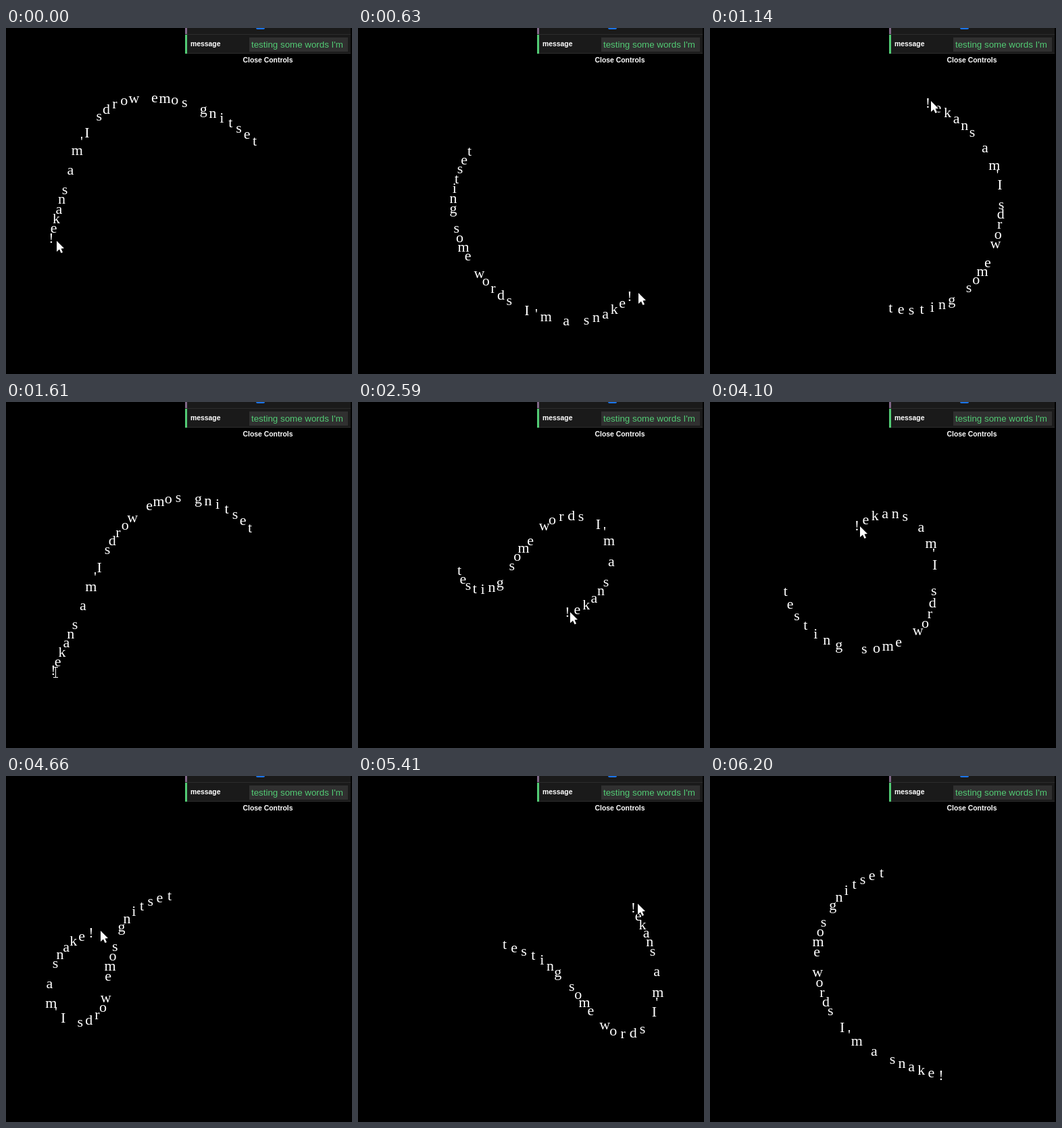
An HTML page with a canvas that plays this animation: 512x512 px, repeating every 6600 ms.

```html
<!DOCTYPE html>
<html>
<head>
<meta charset="utf-8">
<title>Text snake</title>
<style>
  html, body { margin: 0; height: 100%; overflow: hidden; background: #000; }
  canvas { display: block; }
</style>
</head>
<body>
<canvas id="stage" width="512" height="512"></canvas>
<script>
const ctx = document.getElementById('stage').getContext('2d');
const MESSAGE = "testing some words I'm a snake!";
const GAP = 15, SPAN = 5, LOOP = 6600, SUBSTEPS = 8;

// Each stop: time, body (every fifth letter, tail to head), and the head's route to the next stop.
const stops = [
  { time: 0, steps: 12,
    body: [[368,169],[306,128],[235,106],[161,114],[112,170],[87,241],[67,313]],
    route: [[80,420],[150,488],[250,482],[335,441]] },
  { time: 630, steps: 19,
    body: [[165,184],[141,254],[156,326],[200,387],[264,425],[338,434],[402,399]],
    route: [[438,310],[425,200],[350,125],[260,109],[180,160],[120,265]] },
  { time: 1610, steps: 19,
    body: [[361,188],[299,148],[226,149],[166,195],[132,261],[102,331],[70,399]],
    route: [[105,392],[180,315],[235,225],[290,145],[350,124],[382,180],[375,262]] },
  { time: 2590, steps: 18,
    body: [[150,251],[198,276],[245,218],[301,171],[365,194],[367,268],[310,313]],
    route: [[248,322],[205,255],[205,160],[160,82],[95,100],[66,180],[72,265],[112,335]] },
  { time: 3540, steps: 21,
    body: [[247,196],[196,146],[125,132],[81,190],[88,263],[124,328],[172,385]],
    route: [[245,387],[335,335],[358,235],[285,160],[200,200],[158,290],[125,400],[68,385],[62,285]] },
  { time: 4660, steps: 29,
    body: [[242,179],[179,213],[154,283],[135,355],[74,351],[73,279],[126,234]],
    route: [[220,220],[310,280],[360,390],[422,458],[452,360],[425,230],[345,125],
            [240,112],[165,178],[143,285],[180,380],[250,430]] },
  { time: 6200,
    body: [[254,145],[191,181],[160,247],[166,322],[206,385],[270,421],[342,445]],
    route: [] }
];

const sub = (a, b) => [a[0] - b[0], a[1] - b[1]];
const addScaled = (a, b, k) => [a[0] + b[0] * k, a[1] + b[1] * k];
const resize = (v, length) => {
  const k = length / (Math.hypot(v[0], v[1]) || 1);
  return [v[0] * k, v[1] * k];
};

const tangents = points => points.map((p, i) => {
  const d = sub(points[i + 1] || p, points[i - 1] || p);
  return [d[0] / 2, d[1] / 2];
});

function hermite(points, tans, u) {
  const i = Math.min(Math.floor(u), points.length - 2), f = u - i, g = 1 - f;
  return [0, 1].map(k =>
    (1 + 2 * f) * g * g * points[i][k] + f * g * g * tans[i][k] +
    f * f * (3 - 2 * f) * points[i + 1][k] - f * f * g * tans[i + 1][k]);
}

// Mirrors a tangent about the chord, so that the end of the body bends like an arc.
function mirror(tan, from, to) {
  const c = resize(sub(to, from), 1);
  const dot = tan[0] * c[0] + tan[1] * c[1];
  return [2 * dot * c[0] - tan[0], 2 * dot * c[1] - tan[1]];
}

function layLetters(body) {
  const tans = tangents(body).map(t => resize(t, GAP * SPAN)), n = body.length - 1;
  tans[0] = mirror(tans[1], body[0], body[1]);
  tans[n] = mirror(tans[n - 1], body[n - 1], body[n]);
  return [...MESSAGE].map((_, i) => hermite(body, tans, i / SPAN));
}

function buildPoses() {
  const path = stops.flatMap(s => [s.body[s.body.length - 1], ...s.route]);
  const pathTans = tangents(path);
  const head = MESSAGE.length - 1;
  const poses = [{ time: 0, letters: layLetters(stops[0].body) }];
  let start = 0;
  stops.slice(0, -1).forEach((stop, k) => {
    const next = stops[k + 1], pieces = stop.route.length + 1;
    const total = stop.steps * SUBSTEPS, rope = layLetters(stop.body), leg = [];
    for (let s = 1; s <= total; s++) {
      rope[head] = hermite(path, pathTans, start + pieces * s / total);
      for (let i = head - 1; i >= 0; i--)
        rope[i] = addScaled(rope[i + 1], resize(sub(rope[i], rope[i + 1]), GAP), 1);
      if (s % SUBSTEPS === 0) leg.push([...rope]);
    }
    // Ease the simulated rope onto the next known body.
    const drift = layLetters(next.body).map((p, i) => sub(p, rope[i]));
    leg.forEach((letters, s) => {
      const u = (s + 1) / stop.steps;
      poses.push({
        time: stop.time + u * (next.time - stop.time),
        letters: letters.map((p, i) => addScaled(p, drift[i], u))
      });
    });
    start += pieces;
  });
  return poses;
}

function rect(color, x, y, w, h) {
  ctx.fillStyle = color;
  ctx.fillRect(x, y, w, h);
}

function label(text, x, y, color, font, align = 'left') {
  ctx.fillStyle = color;
  ctx.font = font;
  ctx.textAlign = align;
  ctx.fillText(text, x, y);
}

function drawPanel() {
  const small = 'bold 10.4px "Liberation Sans", Arial, sans-serif';
  rect('#1a1a1a', 265, 0, 245, 37);
  rect('#2c2c2c', 265, 9, 245, 1);
  rect('#2c2c2c', 265, 37, 245, 1);
  rect('#806787', 265, 0, 3, 9);
  rect('#52cb74', 265, 10, 3, 28);
  rect('#303030', 360, 14, 146, 21);
  ctx.fillStyle = '#1a73e8';
  ctx.beginPath();
  ctx.roundRect(370, -8, 13, 10, 2);
  ctx.fill();
  label('message', 273, 27, '#fff', small);
  label("testing some words I'm", 363, 29, '#52cb74', '13.333px "Liberation Sans", Arial, sans-serif');
  label('Close Controls', 387.5, 51, '#fff', small, 'center');
}

function drawPointer(letters, time) {
  const n = letters.length, dir = resize(sub(letters[n - 1], letters[n - 2]), 5.35);
  const [x, y] = addScaled(letters[n - 1], dir, 1).map((v, k) => Math.round(v + [9.4, -3.1][k]));
  if (time > 1560 && time < 1720) {
    rect('#fff', x - 4, y - 9, 1, 15);
    rect('#fff', x - 7, y - 9, 7, 1);
    rect('#fff', x - 7, y + 6, 7, 1);
    return;
  }
  ctx.beginPath();
  [[0,0],[0,16],[4,12.5],[6.5,18],[9,17],[6.5,11.5],[11,11]].forEach(p => ctx.lineTo(x + p[0], y + p[1]));
  ctx.closePath();
  ctx.strokeStyle = '#000';
  ctx.lineWidth = 2;
  ctx.stroke();
  ctx.fillStyle = '#fff';
  ctx.fill();
}

const poses = buildPoses();
const origin = performance.now();

function draw() {
  const now = (performance.now() - origin) % LOOP;
  const { time, letters } = poses.findLast(p => p.time <= now + 0.5);
  rect('#000', 0, 0, 512, 512);
  letters.forEach(([x, y], i) =>
    label(MESSAGE[i], x, y + 5, '#fff', '22px "Liberation Serif", "Times New Roman", serif', 'center'));
  drawPanel();
  if (time < 6190) drawPointer(letters, time);
  requestAnimationFrame(draw);
}
draw();
</script>
</body>
</html>
```
